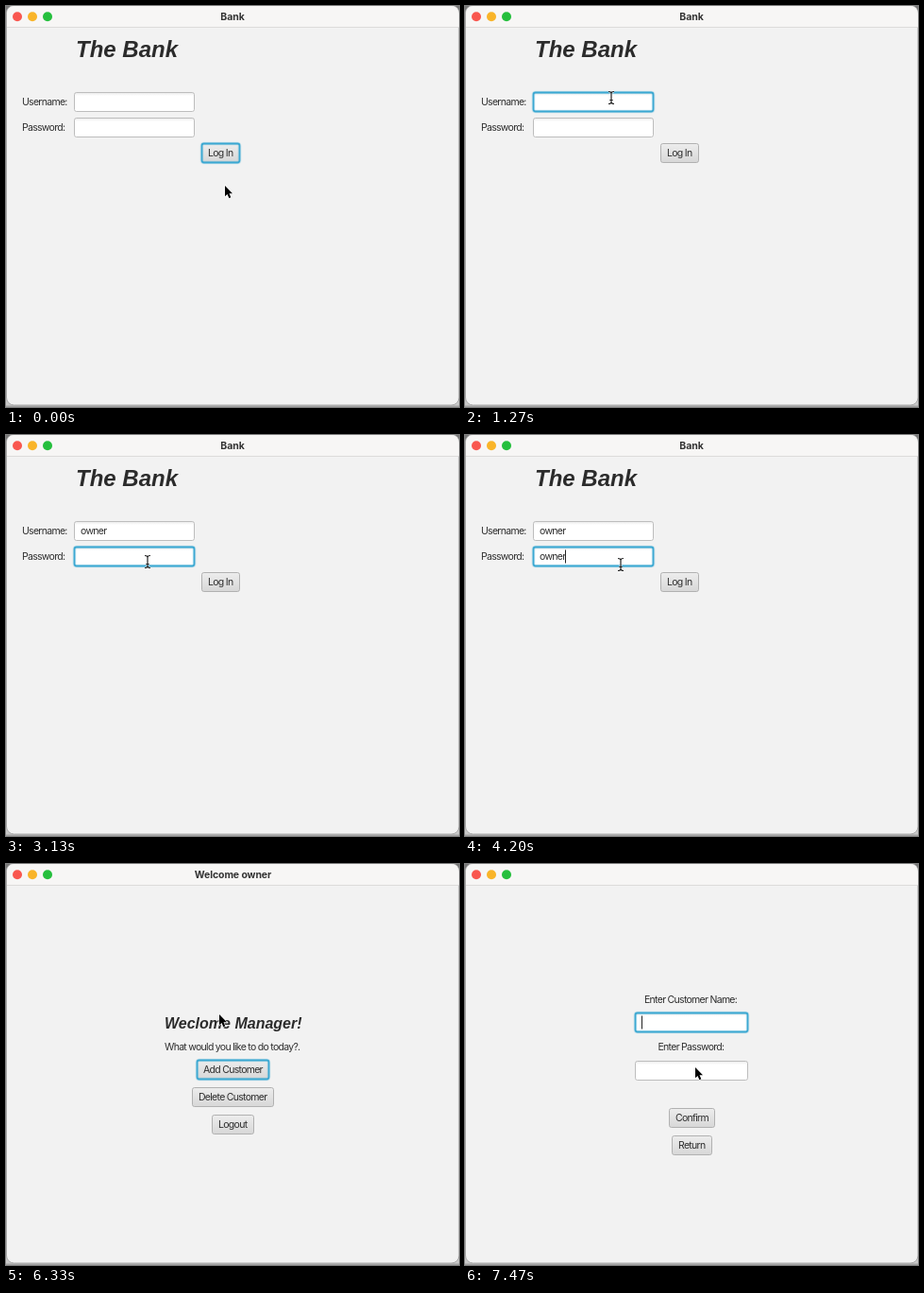
These frames come from a looping animation (480 by 424 pixels, 8000 ms). An HTML page:

```html
<!DOCTYPE html>
<html lang="en">
<head>
<meta charset="utf-8">
<title>Bank</title>
<style>
  html, body { margin: 0; width: 100%; height: 100%; overflow: hidden; background: #8f8f8f; }
  svg { display: block; width: 480px; height: 424px; }
  text { font: 10.5px Inter, sans-serif; letter-spacing: -.71px; fill: #2e2e2e; white-space: pre; }
  .bar { font-weight: 700; letter-spacing: -.1px; text-anchor: middle; fill: #333; }
  .head { font: italic 700 24px "Liberation Sans", Arial, sans-serif; letter-spacing: 0; fill: #2b2b2b; }
  .sub { font-size: 16px; }
  .ring { fill: none; stroke: #3ba8d2; }
  .glow { stroke-width: 3.6; opacity: .22; }
  .line { stroke-width: 1.8; }
</style>
</head>
<body>
<svg id="stage" viewBox="0 0 480 424" xmlns="http://www.w3.org/2000/svg">
  <defs>
    <linearGradient id="normal" x2="0" y2="1"><stop stop-color="#ededed"/><stop offset="1" stop-color="#d7d7d7"/></linearGradient>
    <linearGradient id="hover" x2="0" y2="1"><stop stop-color="#f3f3f3"/><stop offset="1" stop-color="#e1e1e1"/></linearGradient>
    <linearGradient id="pressed" x2="0" y2="1"><stop stop-color="#d9d9d9"/><stop offset="1" stop-color="#c5c5c5"/></linearGradient>
    <linearGradient id="inset" x2="0" y2="1"><stop stop-color="#eaeaea"/><stop offset=".18" stop-color="#fff"/></linearGradient>
    <clipPath id="frame"><rect x="1" width="479" height="421.5" rx="8"/></clipPath>
  </defs>
  <rect width="480" height="424" fill="#c9c9c9"/>
  <path d="M0 0H10V10H0zM470 0H480V10H470z" fill="#777"/>
  <path d="M0 422.5H480V424H0z" fill="#a2a2a2"/>
  <rect x=".5" y="-.5" width="479.5" height="422.5" rx="8" fill="#f2f2f2" stroke="#a9a9a9"/>
  <g clip-path="url(#frame)">
    <path d="M0 0H480V22H0z" fill="#f7f6f5"/>
    <path d="M0 22.5H480" stroke="#dcdbda"/>
  </g>
  <circle cx="12" cy="11.3" r="5" fill="#f9574f"/>
  <circle cx="28" cy="11.3" r="5" fill="#f9b429"/>
  <circle cx="44" cy="11.3" r="5" fill="#25bf3d"/>
</svg>
<script>
const LOOP = 8000, STEP = 1000 / 15;
const USER = 'owner';
const stage = document.getElementById('stage');

function add(parent, tag, attrs = {}, content = '') {
  const node = document.createElementNS('http://www.w3.org/2000/svg', tag);
  for (const key in attrs) node.setAttribute(key, attrs[key]);
  node.textContent = content;
  return parent.appendChild(node);
}
const show = (node, on) => node.setAttribute('visibility', on ? 'inherit' : 'hidden');
const label = (parent, x, y, content, cls = '') => add(parent, 'text', { x, y, class: cls }, content);

function control(parent, x, y, w, fill, stroke) {
  const box = { x: x + .5, y: y + .5, width: w - 1, height: 20, rx: 2.2 };
  const face = add(parent, 'rect', { ...box, fill, stroke });
  const ring = add(parent, 'g');
  for (const part of ['glow', 'line']) add(ring, 'rect', { ...box, class: 'ring ' + part });
  show(ring, false);
  return { x, y, w, face, ring };
}
const paint = (item, state) => item.face.setAttribute('fill', `url(#${state})`);

function field(parent, x, y, w) {
  const item = control(parent, x, y, w, 'url(#inset)', '#bdbdbd');
  item.text = label(parent, x + 7, y + 14, '');
  item.caret = add(parent, 'path', { stroke: '#222' });
  return item;
}
function button(parent, x, y, w, content) {
  const item = control(parent, x, y, w, 'url(#normal)', '#b1b1b1');
  label(parent, x + 7, y + 14.3, content);
  return item;
}
function setField(item, content, focused, caretOn) {
  item.text.textContent = content;
  show(item.ring, focused);
  show(item.caret, caretOn);
  const x = item.x + 7.5 + (content ? Math.round(item.text.getComputedTextLength()) : 0);
  item.caret.setAttribute('d', `M${x} ${item.y + 3.5}v14`);
}

const [login, menu, form] = [0, 1, 2].map(() => add(stage, 'g'));

label(login, 240, 14.5, 'Bank', 'bar');
label(login, 74, 53.5, 'The Bank', 'head');
label(login, 17, 105.2, 'Username:');
label(login, 17, 132.2, 'Password:');
const userField = field(login, 72, 91, 128);
const passField = field(login, 72, 118, 128);
const logIn = button(login, 207, 145, 41, 'Log In');

label(menu, 240.5, 14.5, 'Welcome ' + USER, 'bar');
label(menu, 168, 174.3, 'Weclome Manager!', 'head sub');
label(menu, 168, 196.5, 'What would you like to do today?.');
const addCustomer = button(menu, 202, 207, 77, 'Add Customer');
button(menu, 197, 236, 87, 'Delete Customer');
button(menu, 218, 265, 45, 'Logout');
show(addCustomer.ring, true);

label(form, 190, 146.8, 'Enter Customer Name:');
const nameField = field(form, 180, 157, 120);
label(form, 204.5, 197, 'Enter Password:');
const newPassField = field(form, 180, 208, 120);
button(form, 216, 258, 49, 'Confirm');
button(form, 219, 287, 43, 'Return');
setField(nameField, '', true, true);
setField(newPassField, '', false, false);

const mouse = add(stage, 'g');
const arrow = add(mouse, 'path', {
  d: 'M0 0V11.2L2.5 9 4.4 13.2 6.3 12.3 4.5 8.3H8Z',
  stroke: '#fff', 'stroke-width': 1.2, 'paint-order': 'stroke', 'stroke-linejoin': 'round'
});
const beam = add(mouse, 'g', { fill: 'none' });
const beamPath = 'M-3 -6.5Q0 -6.5 0 -4.5Q0 -6.5 3 -6.5M0 -5V5M-3 6.5Q0 6.5 0 4.5Q0 6.5 3 6.5M-1.7 2.5H1.7';
add(beam, 'path', { d: beamPath, stroke: '#fff', 'stroke-width': 2.4, opacity: .7 });
add(beam, 'path', { d: beamPath, stroke: '#222', 'stroke-width': 1.2 });

// Pointer way points: time, x, y
const route = [
  [0, 232, 190], [400, 158, 76], [530, 155, 97], [2000, 155, 97], [2470, 150, 134],
  [4130, 150, 134], [4200, 165, 137], [4600, 228, 182], [4870, 226, 158], [6270, 226, 158],
  [6330, 226, 159], [6670, 246, 223], [6870, 244, 215], [LOOP, 244, 215]
];
const userKeys = [1330, 1470, 1600, 1670, 1800];
const passKeys = [3270, 3400, 3600, 3730, 3800];
const userCaret = [[800, 1270], [1330, 2330]];
const passCaret = [[2800, 3130], [3270, 4330], [4800, 5200]];

const within = (t, from, to) => t >= from && t < to;
const anyOf = (t, spans) => spans.some(([from, to]) => within(t, from, to));
const typed = (t, keys) => USER.slice(0, keys.filter(key => key <= t).length);
const inside = (item, x, y) => within(x, item.x, item.x + item.w) && within(y, item.y, item.y + 21);

function pointerAt(t) {
  const i = route.findIndex((point, n) => n && point[0] >= t);
  const [t0, x0, y0] = route[i - 1], [t1, x1, y1] = route[i];
  const p = (t - t0) / (t1 - t0), ease = p * p * (3 - 2 * p);
  return [x0 + (x1 - x0) * ease, y0 + (y1 - y0) * ease];
}

function render(time) {
  // The screen refreshes fifteen times a second
  const t = Math.round(Math.floor((time % LOOP + 5) / STEP) * STEP / 10) * 10 % LOOP;
  const page = t < 5330 ? login : t < 7330 ? menu : form;
  for (const view of [login, menu, form]) view.style.display = view === page ? '' : 'none';

  const [x, y] = pointerAt(t);
  if (page === login) {
    setField(userField, typed(t, userKeys), within(t, 730, 2800), anyOf(t, userCaret));
    setField(passField, typed(t, passKeys), within(t, 2800, 5200), anyOf(t, passCaret));
    show(logIn.ring, !within(t, 730, 5200));
    paint(logIn, t >= 5200 ? 'pressed' : 'normal');
  }
  paint(addCustomer, t >= 7270 ? 'pressed' : inside(addCustomer, x, y) ? 'hover' : 'normal');

  const fields = page === login ? [userField, passField] : page === form ? [newPassField] : [];
  const textCursor = t < 7470 && fields.some(item => inside(item, x, y));
  mouse.setAttribute('transform', `translate(${Math.round(x)} ${Math.round(y)})`);
  show(arrow, !textCursor);
  show(beam, textCursor);
}

const start = performance.now();
function tick() {
  render(performance.now() - start);
  requestAnimationFrame(tick);
}
tick();
</script>
</body>
</html>
```
